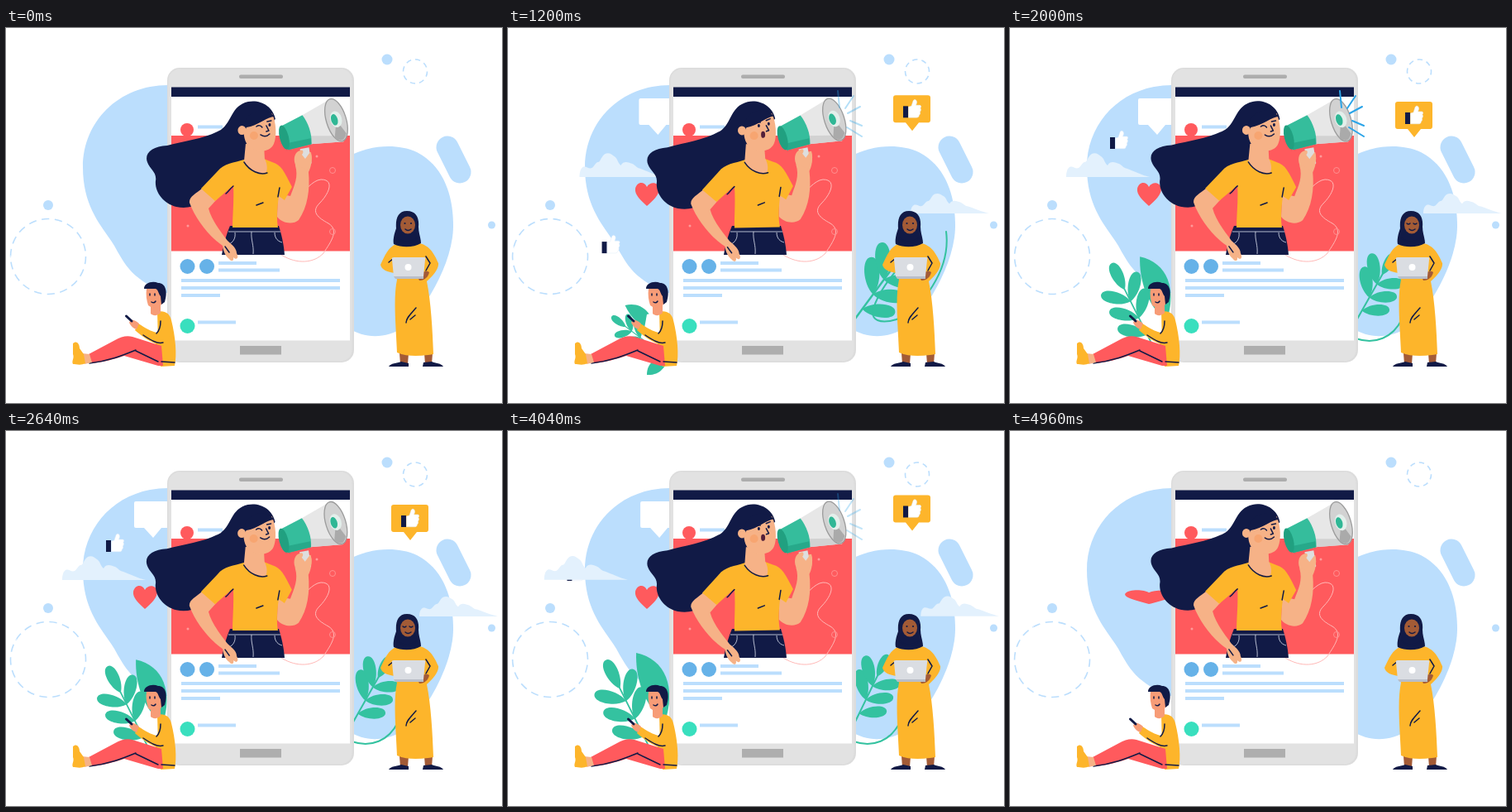
These frames come from a looping animation (600 by 453 pixels, 5 s). An HTML page:

```html
<!DOCTYPE html>
<html lang="en">
<head>
<meta charset="utf-8">
<title>Social media announcement</title>
<style>
html, body { margin: 0; width: 100%; height: 100%; overflow: hidden; background: #fff; }
svg { display: block; width: 100%; height: 100%; }
.sky { fill: #bbdefd; }
.navy { fill: #111a46; }
.red { fill: #ff5a5d; }
.sun { fill: #fdb52b; }
.skin { fill: #f6b287; }
.tan { fill: #f79c77; }
.brown { fill: #a35b36; }
.green { fill: #34c2a0; }
.line { fill: none; stroke: #111a46; stroke-width: 1.5; stroke-linecap: round; stroke-linejoin: round; }
.vine { fill: none; stroke: #34c2a0; stroke-width: 2; stroke-linecap: round; }
.dash { fill: none; stroke: #bbdefd; stroke-width: 1.6; }
</style>
</head>
<body>
<svg viewBox="0 0 600 453" preserveAspectRatio="none">
<defs>
  <g id="thumb">
    <rect class="navy" width="6" height="14"/>
    <path fill="#fff" stroke="#e1edf8" stroke-width=".5" d="M6.5 1L10 0L12 -6C13 -9 17 -8 16.500 -4L15.500 -1H20C22 -1 22 1.500 20.800 2.500C22 4 21.500 6 20.300 7C21 9 20.500 10 19.300 11C19.300 13 18 13.800 16 13.800H6.500Z"/>
  </g>
  <path id="cloud" fill="#e3f1fd" d="M0 0C0 -5 1 -10 4 -12C8 -14 11 -9 15 -11C18 -13 19 -17 22 -18C25 -17 26 -25 31 -28C36 -30 39 -27 42 -25C46 -23 46 -17 50 -14C54 -21 60 -17 64 -16C68 -14 69 -11 74 -10C80 -8 92 -2 101 0Z"/>
</defs>

<g class="sky">
  <path d="M200 69C138 67 93 112 93 168C93 218 117 240 131 263C143 284 152 306 200 322Z"/>
  <path d="M415 155C437 143 470 138 497 150C530 167 541 203 541 239C541 282 509 338 482 361C458 377 432 374 415 363Z"/>
  <path d="M534 144L549 174" stroke="#bbdefd" stroke-width="27" stroke-linecap="round"/>
  <circle cx="51" cy="214" r="6"/><circle cx="461" cy="38" r="6.500"/><circle cx="587.500" cy="238" r="4.500"/>
</g>
<circle id="ringL" class="dash" cx="51" cy="276" r="45.500" pathLength="216" stroke-dasharray="7 5"/>
<circle id="ringR" class="dash" cx="495" cy="52.500" r="14.500" pathLength="72" stroke-dasharray="5 4"/>

<use id="thumbL" href="#thumb"/>
<use id="cloudL" href="#cloud"/>
<path id="talk" fill="#fff" d="M157 85H215V117H188L178 129L167 117H157Q155 117 155 115V87Q155 85 157 85Z"/>
<path id="heart" class="red" d="M168 215C161 208 153 202 154 194C156 185 165 185 168 192C172 185 182 186 183 194C183 202 175 209 168 215Z"/>
<g id="like">
  <path class="sun" d="M469 89H508Q511 89 511 92V119Q511 122 508 122H497L489 132L481 122H469Q466 122 466 119V92Q466 89 469 89Z"/>
  <use href="#thumb" x="478" y="102"/>
</g>
<g id="plantL"><path class="green" d="M153 260C191 268 205 305 190 350C162 326 152 292 153 260Z"/></g>
<path id="sprout" class="green" d="M168 419C168 403 180 398 194 398C191 410 183 420 168 419Z"/>
<g id="plantR"></g>
<path id="vineLow" class="vine" d="M418 375C442 383 463 374 474 352"/>
<path id="vineLoop" class="vine" d="M530 246C536 292 500 340 470 352C450 358 438 353 442 339C447 322 462 300 480 282"/>
<g id="cloudR"><use href="#cloud" transform="scale(.94 .84)"/></g>

<!-- phone -->
<rect x="195" y="48" width="226" height="356" rx="15" fill="#dcdcdc"/>
<rect x="196.500" y="49.500" width="222" height="353" rx="14" fill="#e2e2e2"/>
<rect x="200" y="72" width="216" height="305.500" fill="#fff"/>
<rect class="navy" x="200" y="71.500" width="216" height="11.500"/>
<rect x="282" y="56.500" width="53" height="4.500" rx="2" fill="#adadad"/>
<rect x="283" y="384" width="50" height="10.500" fill="#aeaeae"/>
<circle class="red" cx="219" cy="123" r="8"/>
<rect class="red" x="200" y="130" width="216" height="139.500"/>
<g fill="#66b2e8"><circle cx="219.500" cy="288" r="9"/><circle cx="243" cy="288" r="9"/></g>
<circle cx="219.500" cy="360" r="9" fill="#39dfbe"/>
<path stroke="#bbdefd" stroke-width="4" d="M232 119.500H262M257 284H303M257 292.500H331M212 305H404M212 314H404M212 323H259M232 355.500H278"/>
<g fill="none" stroke="#ffb9b7">
  <path d="M351 203C362 198 370 184 381 183C398 183 391 200 379 212C369 222 377 229 390 236C403 244 394 257 384 272C373 284 352 286 333 274"/>
  <g stroke="#ff8f8f"><circle cx="395" cy="172" r="3.500"/><circle cx="395" cy="246" r="3.500"/></g>
</g>
<g fill="#ff9a99"><circle cx="376" cy="155" r="1.500"/><circle cx="220" cy="239" r="1.500"/></g>

<!-- speaker -->
<path class="navy" d="M271 239H330C334 252 336 262 337 274H261C263 262 266 251 271 239Z"/>
<path fill="none" stroke="#dfe4f2" stroke-width=".8" d="M269 246H332M297 246C296 256 300 262 299 273M277 247C278 255 274 259 270 261M325 247C325 255 330 258 334 259"/>
<g id="body">
  <path class="navy" d="M326 110C323 94 307 86 293 89C272 94 274 113 260 123C240 134 218 136 195 142C177 143 167 151 171 162C174 171 183 174 181 185C180 198 190 212 206 216C225 220 240 211 250 197C261 183 280 182 292 163L301 135Z"/>
  <path class="skin" d="M237 194C230 200 221 204 222 211C229 231 247 253 262 263C263 271 266 276 270 279C273 283 276 281 275 277C279 281 282 278 279 272C279 267 275 263 268 257C257 243 248 230 245 218L255 207Z"/>
  <path class="line" d="M265 264L270 271" stroke="#df8c5c"/>
  <path class="skin" d="M329 200L328 228C334 236 347 238 354 232C365 216 368 195 366 174C369 168 371 160 369 150L351 153L350 166C354 180 349 190 344 203Z"/>
  <path class="sun" d="M288 159C276 163 264 163 256 173L236 194L253 209L275 190C276 210 274 226 274 241H329C327 230 328 218 330 203L337 208L346 192C337 174 333 165 322 162L312 158Z"/>
  <path class="skin" d="M290 140L288 161C294 173 308 178 315 174C317 168 315 162 313 158L312 140Z"/>
  <path class="line" d="M288 162C295 173 307 178 316 175M275 191C271 194 269 198 266 200M303 214L311 211M329 204L331 193"/>
  <path class="skin" d="M288 119C300 118 318 110 322 103C327 114 328 131 324 140C319 151 303 150 296 145C288 139 287 128 288 119Z"/>
  <path class="navy" d="M287 129C284 104 309 90 325 107C316 107 305 118 291 120Z"/>
  <ellipse class="skin" cx="285.500" cy="123.500" rx="5" ry="5.500"/>
  <circle cx="300" cy="130" r="5" fill="#f79a5f" opacity=".55"/>
  <path class="line" d="M315 118L318 124L315 125" stroke="#d97850" stroke-width="1"/>
  <g id="smile">
    <path class="line" d="M303 119Q307 116 310 120M316 113L321 112M308 129Q314 133 319 128"/>
    <ellipse class="navy" cx="319" cy="117" rx="1.500" ry="2"/>
  </g>
  <g id="shout">
    <path class="line" d="M301 113L308 114M315 112L320 110"/>
    <ellipse class="navy" cx="306" cy="118" rx="1.500" ry="2"/><ellipse class="navy" cx="318" cy="116" rx="1.500" ry="2"/>
    <ellipse cx="311" cy="129" rx="2.500" ry="4" fill="#53203a"/>
  </g>
  <g id="horn">
    <path d="M354 146L365 144L368 163Q364 168 359 165Z" fill="#dedede"/>
    <path d="M357 105L390 86L407 137L367 140Z" fill="#e7e7e7"/>
    <path d="M364 130L404 130L407 137L367 140Z" fill="#d2d2d2"/>
    <path d="M332 118L357 105C364 114 369 128 368 140L340 147C333 139 330 128 332 118Z" fill="#35bd9c"/>
    <path d="M338 139L367 133L368 140L340 147Z" fill="#27a98a"/>
    <ellipse cx="335" cy="132" rx="5.500" ry="15" transform="rotate(-14 335 132)" fill="#21a080"/>
    <g transform="rotate(-17 398 111)">
      <ellipse cx="398" cy="111" rx="12" ry="26.500" fill="#d2d2d2" stroke="#9c9c9c" stroke-width="1.300"/>
      <path d="M398 111L390 131Q398 142 405 130Z" fill="#aaa"/>
      <ellipse cx="398" cy="110" rx="7" ry="10" fill="#e3efeb"/>
      <ellipse cx="396" cy="110" rx="4" ry="7" fill="#2fb795"/>
    </g>
  </g>
  <path class="skin" d="M350 165C347 157 350 149 356 148C359 146 361 150 358 153L362 158L368 150C372 156 369 165 366 172Z"/>
</g>
<path id="waves" fill="none" stroke="#2ba4e8" stroke-width="2" stroke-linecap="round" d="M399 76L401 96M408 97L418 82M411 103L426 95M414 112L428 118M410 120L428 131"/>

<!-- seated man -->
<path class="sun" d="M176 345C189 339 198 343 200 353C205 373 207 395 204 408L187 409L180 378Z"/>
<path d="M168 346L183 342L184 381L164 368Z" fill="#fff"/>
<path class="tan" d="M175 335L187 331L187 344C183 348 178 348 175 345Z"/>
<path class="tan" d="M170 315C177 313 187 315 190 320V331C186 339 176 339 172 335C170 329 169 322 170 315Z"/>
<path class="navy" d="M167 315C167 308 177 305 184 308C193 308 196 318 192 331L188 334L187 324C184 321 185 317 181 315Z"/>
<path class="line" d="M174 321V323M180 321V323M176 331Q179 333 181 330" stroke-width="1"/>
<path class="red" d="M188 384L153 373C146 371 139 373 132 377L100 394L103 405C117 404 131 400 143 396L184 408L190 408Z"/>
<path class="line" d="M101 405C125 402 140 396 157 389M157 390L184 403" stroke-width="1.200"/>
<path class="skin" d="M92 393L101 394L104 404L95 406Z"/>
<path class="sun" d="M81 381C85 377 89 381 89 387L94 394L96 405C91 408 84 406 81 406C79 402 83 399 81 394Z"/>
<path class="sun" d="M194 348C203 358 200 382 187 383C176 381 164 372 156 365L160 357C168 362 176 367 183 368L187 353Z"/>
<path class="line" d="M187 354C187 361 185 366 182 369M166 371C175 377 183 382 190 380M188 403L204 404" stroke-width="1.200"/>
<path class="tan" d="M161 357C154 351 150 352 149 356C151 360 154 363 158 364Z"/>
<path d="M145.500 348L152 354" stroke="#111a46" stroke-width="3" stroke-linecap="round"/>

<!-- standing woman -->
<path class="brown" d="M476 393H487L486 406H477ZM506 393H516L515 406H507Z"/>
<path class="navy" d="M463 409C465 405 473 405 478 403L487 405V409ZM504 409L505 404L515 403C519 405 527 405 529 409Z"/>
<path class="sun" d="M472 261C463 264 458 275 453 286C454 292 462 295 470 296L473 304C468 327 472 364 473 392C487 398 504 396 517 394C516 365 514 330 509 306C516 300 524 291 523 284C518 273 513 263 500 260Z"/>
<path class="line" d="M463 283L469 278M508 276L513 284L508 293M496 338C490 345 484 350 484 356M489 352L495 347" stroke-width="1.200"/>
<path class="navy" d="M485 221C474 221 471 231 472 242C469 250 468 257 469 261C479 266 494 265 502 260C502 254 499 248 499 240C500 229 496 221 485 221Z"/>
<ellipse class="brown" cx="486" cy="238" rx="9" ry="10.500"/>
<g id="eyes" class="navy"><circle cx="482.500" cy="236" r="1.100"/><circle cx="490" cy="236" r="1.100"/></g>
<path id="lids" class="line" stroke-width="1" d="M480 236Q482 238 484 236M488 236Q490 238 492 236"/>
<path class="line" d="M483 243Q486 246 490 243" stroke="#f3dccd"/>
<path class="line" d="M474 254C481 260 491 260 499 252" stroke="#2c376c" stroke-width="1"/>
<path class="brown" d="M498 301C502 295 508 292 512 295C511 301 506 305 500 305Z"/>
<path fill="#dadde2" d="M469 277H506Q508 277 507 280L505 300H469L467 280Q466 277 469 277Z"/>
<path fill="#b9bec8" d="M469 300H505V303H471Z"/>
<circle cx="486.500" cy="289" r="4" fill="#fff"/>
</svg>
<script>
const LOOP = 5000;
const $ = id => document.getElementById(id);

function addPath(parent, d, cls) {
  const el = document.createElementNS('http://www.w3.org/2000/svg', 'path');
  el.setAttribute('d', d);
  el.setAttribute('class', cls);
  $(parent).append(el);
}

// Leaf growing from (x, y) by (dx, dy), rounder towards its tip.
function leaf(id, x, y, dx, dy) {
  const side = s => [.3, 1].map(k => `${x + dx * k - dy * s} ${y + dy * k + dx * s}`);
  const [a, b] = side(.27), [c, d] = side(-.27);
  addPath(id, `M${x} ${y}C${a} ${b} ${x + dx} ${y + dy}C${d} ${c} ${x} ${y}Z`, 'green');
}

// Stem from (x, y) with n side leaves along it, upright leaves and one at the tip.
function plant(id, x, y, [dx, dy], n, [sx, sy], [ux, uy]) {
  addPath(id, `M${x - dx} ${y - dy}L${x + dx * n} ${y + dy * n}`, 'vine');
  for (let i = 0; i < n; i++) {
    leaf(id, x + dx * i, y + dy * i, sx, sy);
    if (i) leaf(id, x + dx * i, y + dy * i, ux, uy);
  }
  leaf(id, x + dx * (n - .3), y + dy * (n - .3), dx * 1.6, dy * 1.6);
}
plant('plantL', 163, 368, [-11.5, -23], 3, [-41, -9], [9, -41]);
plant('plantR', 424, 341, [7, -17], 3, [33, -5], [-11, -36]);

const ramp = (t, a, b) => {
  const k = Math.min(1, Math.max(0, (t - a) / (b - a)));
  return k * k * (3 - 2 * k);
};
const bump = (t, a, b, c, d) => ramp(t, a, b) - ramp(t, c, d);
const within = (t, a, b) => t >= a && t < b ? 1 : 0;

const set = (id, v) => $(id).setAttribute('transform', v);
const move = (id, x, y) => set(id, `translate(${x} ${y})`);
const show = (id, v) => $(id).setAttribute('opacity', v);
const spin = (id, deg, x, y) => set(id, `rotate(${deg} ${x} ${y})`);
const scale = (id, x, y, sx, sy = sx, deg = 0) =>
  set(id, `translate(${x} ${y}) rotate(${deg}) scale(${sx} ${sy}) translate(${-x} ${-y})`);

function draw(t) {
  spin('ringL', 60 * t / LOOP, 51, 276);
  spin('ringR', 90 * t / LOOP, 495, 52.5);

  // The speaker leans towards the horn on each call.
  const lean = 1 - ramp(t, -250, 700) + bump(t, 1250, 1700, 2300, 3300) + ramp(t, 4080, 4550);
  spin('body', 1.4 * lean - 1.2, 303, 243);
  move('horn', 2.5 * lean - .5, 1.5 * (1 - lean));
  const shout = within(t, 960, 1560) + within(t, 3800, 4400);
  show('shout', shout);
  show('smile', 1 - shout);
  show('waves', bump(t, 1000, 1500, 2040, 2240) + bump(t, 3900, 4300, 4700, 4850));

  const closed = within(t, 1800, 3700);
  show('lids', closed);
  show('eyes', 1 - closed);

  // Floating parts come in, drift and leave.
  const gone = 1 - bump(t, 300, 1350, 3900, 4700);
  const settle = ramp(t, 1200, 2000);
  const back = bump(t, 2640, 3360, 3600, 4200);
  move('talk', 62 * gone, 0);
  move('like', 0, -140 * gone);
  move('cloudL', 98 - 30 * settle - 40 * back - 210 * gone, 180 - 2 * back);
  move('cloudR', 480 + 20 * settle - 4 * back + 130 * (1 - bump(t, 300, 1350, 4200, 5050)), 224 - 2 * back);

  const slide = ramp(t, 2640, 4200), drop = ramp(t, 4100, 4700);
  const rise = 1 - ramp(t, 350, 1800);
  move('thumbL', 121 - 20 * rise - 51 * slide - 110 * drop, 132 + 340 * rise + 36 * slide + 150 * drop);

  const squash = ramp(t, 4640, 4960);
  const tuck = 55 * (1 - ramp(t, 450, 950));
  scale('heart', 168, 200, 1 + 1.05 * squash, 1 - .4 * squash);
  $('heart').style.translate = `${tuck}px`;

  const grown = bump(t, 500, 1750, 4300, 4800);
  const sway = ramp(t, 2640, 3360) - .5 * ramp(t, 3360, 4040);
  const early = bump(t, 500, 1120, 1200, 1700);
  scale('plantL', 185, 385, grown * (.87 + .13 * sway), undefined, -65 * (1 - grown));
  scale('plantR', 421, 355, Math.max(grown, early) * (1 + .2 * early), undefined, 7 * (1 - sway) + 7 * early);
  scale('sprout', 194, 398, early);
  show('vineLoop', bump(t, 800, 1000, 1280, 1480));
  show('vineLow', bump(t, 1300, 1550, 4300, 4600));
}

function tick(now) {
  draw(now % LOOP);
  requestAnimationFrame(tick);
}
draw(0);
requestAnimationFrame(tick);
</script>
</body>
</html>
```
